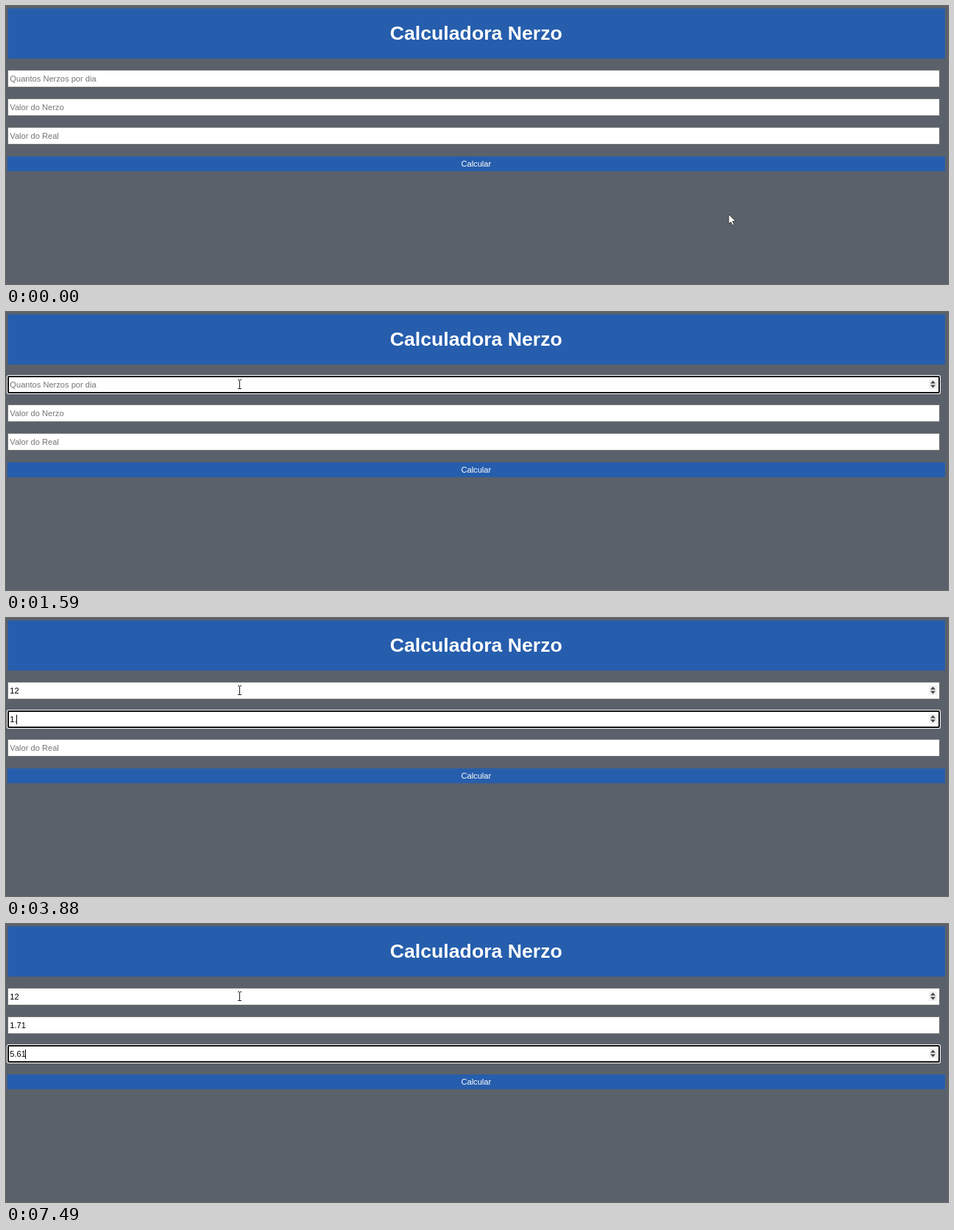
These frames come from a looping animation (1280x379 px, 8000 ms). An HTML page with a canvas:

```html
<!DOCTYPE html>
<html lang="pt">
<head>
<meta charset="utf-8">
<title>Calculadora Nerzo</title>
<style>
html, body { margin: 0; width: 100%; height: 100%; overflow: hidden; background: #5b616a; }
canvas { display: block; }
</style>
</head>
<body>
<canvas id="stage" width="1280" height="379"></canvas>
<script>
const ctx = document.getElementById('stage').getContext('2d');
const LOOP = 8000;
const BLUE = '#265ead';
const FACE = '"Liberation Sans", Arial, sans-serif';
const SMALL = `11.11px ${FACE}`;
const TEXT_X = 5.33;

// Typed values: [time, text]
const fields = [
  { y: 87, hint: 'Quantos Nerzos por dia', keys: [[2220, '1'], [2320, '12']] },
  { y: 126, hint: 'Valor do Nerzo', keys: [[3750, '1'], [3880, '1.'], [5100, '1.7'], [5290, '1.71']] },
  { y: 165, hint: 'Valor do Real', keys: [[6630, '5'], [6830, '5.'], [7360, '5.6'], [7490, '5.61']] }
];

const focusAt = [[1060, 0], [2950, 1], [5620, 2]];

const caretAt = [
  [1060, true], [1590, false], [2120, true], [2870, false],
  [2950, true], [3480, false], [3750, true], [4430, false],
  [4960, true], [6150, false], [6630, true]
];

// Last value whose time has come
function at(list, t, start) {
  let value = start;
  for (const [time, v] of list) if (t >= time) value = v;
  return value;
}

function box(x, y, w, h, color) {
  ctx.fillStyle = color;
  ctx.fillRect(x, y, w, h);
}

function round(x, y, w, h, r, color) {
  ctx.fillStyle = color;
  ctx.beginPath();
  ctx.roundRect(x, y, w, h, r);
  ctx.fill();
}

function shape(points, color) {
  ctx.fillStyle = color;
  ctx.beginPath();
  points.forEach(([x, y]) => ctx.lineTo(x, y));
  ctx.closePath();
  ctx.fill();
}

function label(text, x, y, font, color, align = 'left') {
  ctx.font = font;
  ctx.fillStyle = color;
  ctx.textAlign = align;
  ctx.fillText(text, x, y);
}

function pointer(t) {
  const step = t < 70 ? 0 : Math.min(11, Math.floor((t - 70) / 71) + 1);
  const p = step / 11;
  const u = p * p * (3 - 2 * p);
  return { x: Math.round(982 - 665 * u), y: Math.round(99 + 185 * (1 - u) ** 1.4) };
}

function spinner(y) {
  box(1254, y + 5, 11, 13, '#efefef');
  shape([[1256, y + 10.5], [1259.5, y + 6.5], [1263, y + 10.5]], '#454545');
  shape([[1256, y + 12.5], [1259.5, y + 16.5], [1263, y + 12.5]], '#454545');
}

function drawField(field, t, focused, hovered) {
  const { y } = field;
  if (focused) {
    round(1, y - 1, 1269, 26, 2.5, '#fff');
    round(2, y, 1267, 24, 2, '#101010');
    box(4, y + 2, 1263, 20, '#fff');
  } else {
    box(2, y, 1267, 24, hovered && t < 1060 ? '#4f4f4f' : '#767676');
    box(3, y + 1, 1265, 22, '#fff');
  }
  if (focused || hovered) spinner(y);

  const value = at(field.keys, t, '');
  label(value || field.hint, TEXT_X, y + 16, SMALL, value ? '#000' : '#757575');
  if (focused && at(caretAt, t, false)) {
    const x = Math.floor(TEXT_X + ctx.measureText(value).width);
    box(x, y + 6, 1, y === 87 ? 12 : 13, '#000');
  }
}

function drawBeam({ x, y }) {
  box(x, y - 6, 1, 12, '#222');
  for (const end of [y - 7, y + 5]) {
    box(x - 2, end, 2, 1, '#222');
    box(x + 1, end, 2, 1, '#222');
  }
}

function drawArrow({ x, y }) {
  ctx.save();
  ctx.translate(x, y);
  shape([[0, 0], [0, 13], [3, 10.4], [5.2, 15], [7.4, 14], [5.3, 9.5], [9.3, 9.2]], '#fff');
  ctx.strokeStyle = '#222';
  ctx.lineWidth = 0.8;
  ctx.stroke();
  ctx.restore();
}

function draw(t) {
  box(0, 0, 1280, 379, '#5b616a');
  box(2.5, 3.3, 1273.5, 68.4, BLUE);
  label('Calculadora Nerzo', 638.8, 46, `bold 26.67px ${FACE}`, '#fff', 'center');
  box(1.7, 205, 1274.3, 20.3, BLUE);
  label('Calcular', 638.8, 219, SMALL, '#fff', 'center');

  const mouse = pointer(t);
  const focus = at(focusAt, t, -1);
  const hover = fields.findIndex(f => mouse.y >= f.y && mouse.y < f.y + 24);
  fields.forEach((f, i) => drawField(f, t, i === focus, i === hover));
  if (hover < 0) drawArrow(mouse);
  else drawBeam(mouse);
}

const start = performance.now();
function tick() {
  draw((performance.now() - start) % LOOP);
  requestAnimationFrame(tick);
}
tick();
</script>
</body>
</html>
```
